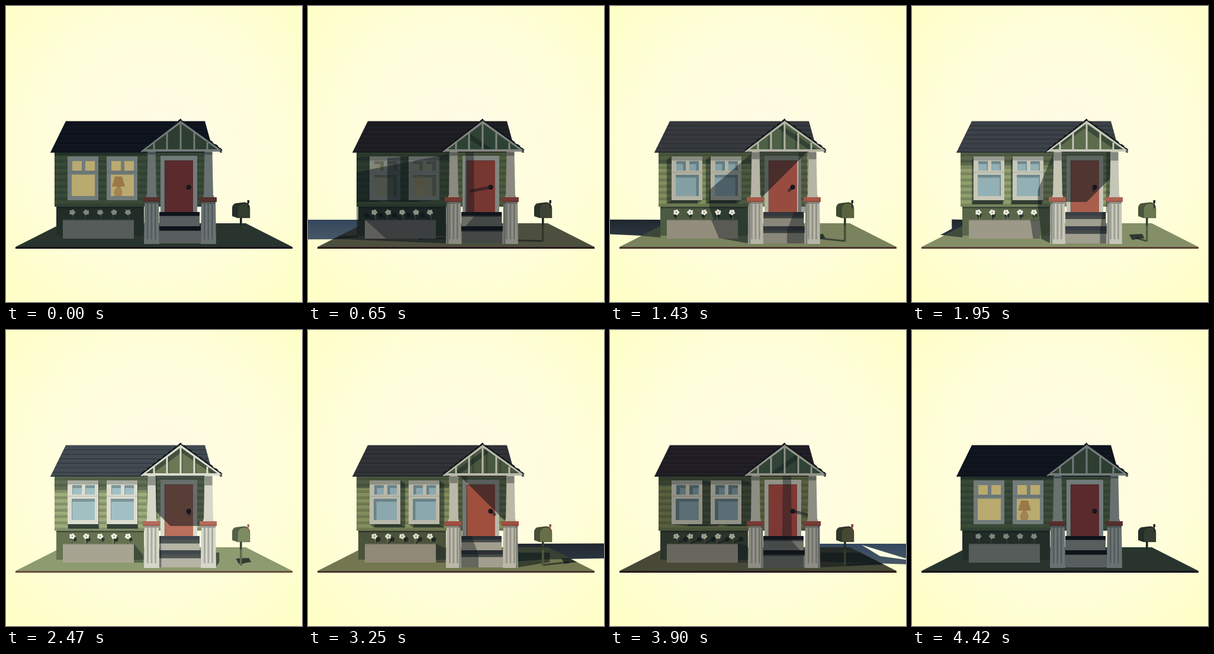
Recreate the animation shown at these times as an HTML page with a canvas. Size 500 by 500 pixels, loop 4.81 s.

```html
<!DOCTYPE html>
<html lang="en">
<head>
<meta charset="utf-8">
<title>House from dusk to dusk</title>
<style>
html, body { margin: 0; width: 100%; height: 100%; overflow: hidden; background: #ffffd8; }
canvas { display: block; width: 500px; height: 500px; }
</style>
</head>
<body>
<canvas id="stage" width="500" height="500"></canvas>
<script>
const ctx = document.getElementById('stage').getContext('2d');
const LOOP = 4810, STEP = 130, LAST = 33, NOON = 17;

// Colours of each material at these hours
const hours = [0, 7, 10, 18, 24, 27, 33];
const palette = {
  roof:    '0e131d 2a2426 35383d 414a51 303236 292226',
  wall:    '3a4a38 5c6841 828f5d 9eac7b 838e5e 676a43',
  gable:   '2d3d31 2f4537 4e6045 6a7855 48573f 324638',
  base:    '222d28 30372b 4d5a42 667250 4a523b 30372c',
  trim:    '717b7a 8d8d82 b2b2a3 dcddcf bab9a9 a39e8e',
  column:  '687170 a39c8d b6b4a5 d6d7c9 bbb8a8 a09b8c',
  door:    '5a2a2d 8d4034 984c40 ba705b a04e3e 8f3f36',
  brick:   '55302d 8c4036 a75747 b66a5a a04f40 8a4037',
  planter: '555c5a 67625a 928d7d a8a492 918977 716c5f',
  ground:  '28342d 68634a 7a835e 8e9a70 72774f 56523b',
  lip:     '17131a 38201d 4b3429 66503a 49342a 321c1d',
  riser:   '575e5d 77756a 898779 b5b4a5 a19e8e 7a7970',
  tread:   '0e131a 17171d 33373c 40474d 2c3035 17171f',
  pane:    '2c3a44 647d83 83a0a5 a2c0c4 8aa8ad 70898d',
  mailbox: '343c31 444833 59643f 7d8b62 686e48 4f4e36',
  petal:   '7d8886 959890 e9eae1 f8f9f1 dfdfd3 b1b0a4'
};
for (const name in palette) {
  const list = palette[name].split(' ').map(h => [0, 2, 4].map(i => parseInt(h.substr(i, 2), 16)));
  palette[name] = [...list, list[0]];
}

const clamp = (v, a, b) => Math.min(b, Math.max(a, v));
const dark = a => `rgba(10,20,27,${a})`;

function colorsAt(k) {
  let i = 0;
  while (i < hours.length - 2 && k >= hours[i + 1]) i++;
  const f = (k - hours[i]) / (hours[i + 1] - hours[i]);
  const out = {};
  for (const name in palette) {
    const a = palette[name][i], b = palette[name][i + 1];
    out[name] = `rgb(${a.map((v, n) => Math.round(v + (b[n] - v) * f))})`;
  }
  return out;
}

function trace(...p) {
  ctx.beginPath();
  for (let i = 0; i < p.length; i += 2) ctx.lineTo(p[i], p[i + 1]);
  ctx.closePath();
}
function poly(fill, ...p) { trace(...p); ctx.fillStyle = fill; ctx.fill(); }
function box(fill, x, y, w, h) { ctx.fillStyle = fill; ctx.fillRect(x, y, w, h); }
function line(color, width, ...p) {
  ctx.beginPath();
  for (let i = 0; i < p.length; i += 2) ctx.lineTo(p[i], p[i + 1]);
  ctx.strokeStyle = color;
  ctx.lineWidth = width;
  ctx.stroke();
}
function disc(fill, x, y, r) {
  ctx.beginPath();
  ctx.arc(x, y, r, 0, 7);
  ctx.fillStyle = fill;
  ctx.fill();
}
function clipped(shape, draw) {
  ctx.save();
  trace(...shape);
  ctx.clip();
  draw();
  ctx.restore();
}

function sky() {
  const g = ctx.createRadialGradient(255, 235, 30, 255, 235, 350);
  g.addColorStop(0, '#fffbe5');
  g.addColorStop(.55, '#fffeda');
  g.addColorStop(1, '#fefec6');
  box(g, 0, 0, 500, 500);
}

function ground(c, sun) {
  const plate = [16, 407, 95, 367, 405, 367, 484, 407];
  const { side, len, tilt } = sun;
  const x0 = side < 0 ? 90 : 350;
  const far = x0 + side * 300 * Math.max(0, len - .25);
  const low = side < 0 ? 374 + 7 * len : 371 + 15.5 * len;
  const cast = [x0, 361, far, 360.5, far, low, x0 + side * 42, 386 + 2 * len, x0 + side * 5, 391];
  const out = sun.up && len > .25;
  if (out) {
    const g = ctx.createLinearGradient(0, 361, 0, 400);
    g.addColorStop(0, len > 1.2 ? '#34475d' : '#20272e');
    g.addColorStop(1, len > 1.2 ? '#4a5a68' : '#323d4a');
    poly(g, ...cast);
    if (side > 0 && len > 1.2) poly('#fffee0', 425, 363, 500, 386, 500, 388, 456, 382);
  }
  poly(c.ground, ...plate);
  clipped(plate, () => {
    if (out) poly(dark(.55), ...cast);
    if (!sun.up) return;
    // porch pedestals and mailbox
    if (tilt > 0) poly(dark(.55), 234, 388, 234, 401, 234 - 50 * tilt, 393, 234 - 50 * tilt, 388);
    else poly(dark(.55), 354, 376, 354, 401, 354 - 60 * tilt, 392, 354 - 60 * tilt, 376);
    const dx = -50 * tilt;
    line(dark(.55), 3, 396, 397, 396 + dx, 392);
    poly(dark(.7), 383 + dx, 386, 405 + dx, 385, 409 + dx, 392, 388 + dx, 395);
  });
  box(c.lip, 16, 407, 468, 3);
}

function pane(c, x, y, w, h, glow, sun) {
  box(c.pane, x, y, w, h);
  ctx.globalAlpha = glow;
  box('#b9aa70', x, y, w, h);
  ctx.globalAlpha = 1;
  if (!sun.up) return;
  box(dark(.25), x, y, w, 5);
  const edge = clamp(5 * sun.len, 1, 6);
  box(dark(.25), sun.side < 0 ? x + w - edge : x, y + 5, edge, h - 5);
}

function windowAt(c, x, glow, lamp, sun) {
  if (sun.up) {
    const dx = -9 * sun.tilt, dy = 8 / (1 + .5 * sun.len);
    poly(dark(.45), x, 254, x + 52, 254, x + 52 + dx, 254 + dy, x + 52 + dx, 328 + dy, x + dx, 328 + dy, x + dx, 254 + dy);
    poly(dark(.45), x, 328, x + 52, 328, x + 52 + dx, 328 + dy, x + dx, 328 + dy);
  }
  box(c.trim, x, 254, 52, 74);
  if (sun.up) box(dark(.25), x, 254, 52, 7);
  box(dark(.12), x, 280, 52, 1.5);
  pane(c, x + 8, 262, 16, 16, glow, sun);
  pane(c, x + 30, 262, 16, 16, glow, sun);
  pane(c, x + 7, 285, 39, 36, glow, sun);
  if (lamp && glow) {
    ctx.globalAlpha = glow;
    poly('#9a7847', 184, 288, 196, 288, 201, 305, 179, 305);
    poly('#a28452', 187, 305, 193, 305, 197, 314, 195, 321, 184, 321, 182, 314);
    ctx.globalAlpha = 1;
  }
}

function wall(c, sun, glow) {
  box(c.base, 85, 338, 148, 50);
  box(c.wall, 82, 247, 254, 92);
  for (let y = 249; y < 338; y += 10.6) {
    box(dark(.17), 82, y, 254, 4.5);
    box(dark(.12), 82, y + 3.8, 254, 1);
  }
  box(dark(.35), 85, 339, 148, 3);
  const eave = sun.up ? 24 / (1 + .2 * sun.len) : 5;
  box(dark(.4), 82, 247, 156, eave);
  clipped([82, 247, 238, 247, 238, 339, 82, 339], () => {
    windowAt(c, 104, glow, false, sun);
    windowAt(c, 170, glow, true, sun);
  });
  if (!sun.up || sun.tilt <= 0) return;
  const w = 78 * sun.tilt;
  clipped([82, 247, 238, 247, 238, 388, 82, 388], () =>
    poly(dark(.45), 238, 250, 238 - w, 311, 238 - w, 339, 238 - w * .75, 388, 238, 388));
}

function mainRoof(c) {
  const shape = [101, 194.5, 336, 194.5, 348, 238, 348, 247.5, 75, 247.5];
  poly(c.roof, ...shape);
  clipped(shape, () => {
    for (let i = 1; i < 7; i++) {
      const y = 195 + i * 7.6;
      line(dark(.4), 1.2, 70, y, 350, y);
      line('rgba(180,190,200,.06)', 1, 70, y + 1.5, 350, y + 1.5);
    }
  });
  line(dark(.6), 1.5, 75, 247, 232, 247);
}

function entry(c, sun) {
  box(c.trim, 261, 253, 62, 96);
  box(c.door, 268, 261, 48, 87);
  line(dark(.3), 1, 268, 348, 268, 261, 316, 261);
  const area = [238, 247, 335, 247, 335, 349, 238, 349];
  if (sun.up) clipped(area, () => {
    const { tilt, side, len } = sun;
    // gable shadow: a diagonal that slides away from noon
    const at = d => 295 + side * (80 * len - 95 + d);
    poly(dark(.55), at(-40), 222, 295 + side * 105, 222, 295 + side * 105, 331, at(69), 331);
    const post = (tilt > 0 ? 334 : 239) - 17 * tilt;
    poly(dark(.4), post, 247, post + 14, 247, post + 15, 349, post - 1, 349);
    line(dark(.5), 5, 309, 306, 309 - 9 * tilt, 313);
  });
  disc('#11141a', 308.5, 306, 4);
  disc('#2a2c30', 307.5, 305, 1.2);
}

function steps(c, sun) {
  const lip = sun.up ? 7 / (1 + .6 * sun.len) : 1;
  for (const [y, depth, h, w] of [[348, 6, 18, 68], [372, 7, 22, 70]]) {
    box(c.tread, 259, y, w, depth);
    box(c.riser, 259, y + depth, w, h);
    box(dark(.6), 259, y + depth, w, lip);
  }
  if (!sun.up) return;
  const w = clamp(32 * sun.len, 0, 68);
  if (sun.tilt > 0) poly(dark(.4), 328, 348, 328 - w * .6, 348, 328 - w, 379, 328 - w, 401, 328, 401);
  else poly(dark(.4), 259, 348, 259 + w * .6, 348, 259 + w, 379, 259 + w, 401, 259, 401);
}

function pillar(c, x, sun) {
  poly(c.column, x + 7.5, 246, x + 20.5, 246, x + 22, 323, x + 6, 323);
  box(c.column, x + 5, 320, 18, 3);
  poly(c.column, x + 2, 331, x + 26, 331, x + 27, 402, x + 1, 402);
  for (const gx of [7.5, 14, 20.5]) {
    box(dark(.22), x + gx - 1.5, 334, 3, 60);
    box('rgba(255,255,240,.08)', x + gx + 1.5, 334, 1.5, 60);
  }
  box(dark(.3), x + 2, 331, 24, 3);
  box(c.brick, x - 1, 323, 29, 8);
  box(dark(.15), x - 1, 329, 29, 2);
  box(dark(.35), x + 7.5, 247, 13, sun.up ? 16 / (1 + .4 * sun.len) : 4);
  if (sun.up && sun.len > .3) {
    const edge = sun.tilt > 0 ? x + 2 : x + 23;
    box(dark(.3), edge, 331, 3.5, 71);
  }
}

function porchRoof(c, sun) {
  const face = [295, 196, 360, 244, 232, 244];
  poly(c.gable, ...face);
  if (sun.up) clipped(face, () => {
    const dx = -12 * sun.tilt;
    line(dark(.4), 8, 229 + dx, 250, 295 + dx, 202, 364 + dx, 250);
    for (const x of [272, 295, 318]) box(dark(.25), x + dx * .5, 198, 3, 46);
  });
  const bars = [[250, 231], [272, 214], [295, 198], [318, 214], [340, 231]];
  for (const [x, y] of bars) box(c.trim, x - 1.5, y, 3, 244 - y);
  box(c.trim, 229, 242, 134, 4);
  line(c.trim, 3.5, 228, 246, 295, 196, 364, 245);
  line('#11161c', 1.6, 227, 245, 295, 192.5, 365, 243.5);
  ctx.setLineDash([6, 5]);
  line('#11161c', 2, 230, 241.5, 295, 191.5, 363, 241);
  ctx.setLineDash([]);
  box(dark(.6), 361, 244, 4, 4);
}

function garden(c, sun) {
  box(c.planter, 96, 361, 120, 32);
  box(dark(.18), 96, 361, 120, 1.5);
  if (sun.up && sun.tilt > 0) {
    const w = Math.min(120, 50 * sun.tilt);
    poly(dark(.42), 216, 361, 216 - w, 361, 216 - w * .7, 393, 216, 393);
  }
  if (sun.up && sun.tilt < 0)
    poly(dark(.4), 216, 361, 232, 361 + 10 / (.4 + sun.len), 232, 393, 216, 393);
  for (let i = 0; i < 5; i++) {
    const x = 112 + i * 23.5, y = 348.5, lean = i % 2 ? 1 : -1;
    if (sun.up) {
      const sx = x + 3 - sun.tilt * 4;
      disc(dark(.6), sx, y + 5, 4);
      line(dark(.5), 2, sx, y + 5, x, 361);
    }
    ctx.beginPath();
    ctx.moveTo(x, y);
    ctx.quadraticCurveTo(x - lean * 3, y + 7, x - lean, 361);
    ctx.strokeStyle = c.mailbox;
    ctx.lineWidth = 1.5;
    ctx.stroke();
    for (let p = 0; p < 5; p++) {
      const a = p * 1.2566 + i * .7;
      disc(c.petal, x + 3.2 * Math.cos(a), y + 2.8 * Math.sin(a), 2.1);
    }
    disc('#9d9860', x, y, 1.2);
  }
}

function mailbox(c, sun) {
  box(c.mailbox, 395, 357, 3.5, 41);
  box(dark(.25), 395, 357, 3.5, 41);
  box(dark(.4), 395, 357, 3.5, 14);
  ctx.beginPath();
  ctx.moveTo(382, 355);
  ctx.lineTo(382, 341);
  ctx.quadraticCurveTo(383, 333, 390, 333);
  ctx.lineTo(403, 331.5);
  ctx.quadraticCurveTo(412, 333, 412, 342);
  ctx.lineTo(412, 358);
  ctx.lineTo(391, 358);
  ctx.closePath();
  ctx.fillStyle = c.mailbox;
  ctx.fill();
  ctx.fillStyle = dark(.35);
  ctx.fill();
  ctx.beginPath();
  ctx.moveTo(391, 358);
  ctx.lineTo(391, 343);
  ctx.quadraticCurveTo(392, 334, 402, 333);
  ctx.quadraticCurveTo(412, 334, 412, 343);
  ctx.lineTo(412, 358);
  ctx.closePath();
  ctx.fillStyle = c.mailbox;
  ctx.fill();
  ctx.strokeStyle = dark(.35);
  ctx.lineWidth = 1;
  ctx.stroke();
  const flag = sun.up && sun.tilt < 0 ? c.brick : '#20201f';
  line(flag, 1.5, 409, 342, 409, 329);
  box(flag, 407.5, 328, 3.5, 5);
}

function draw(k) {
  const up = Math.abs(k - NOON) < 13.5;
  const tilt = up ? clamp(Math.tan((NOON - k) * .105), -4, 4) : 0;
  const sun = { up, tilt, len: Math.abs(tilt), side: tilt > 0 ? -1 : 1 };
  const glow = clamp(Math.max((5 - k) / 2, (k - 29) / 2), 0, 1);
  const c = colorsAt(k);
  sky();
  ground(c, sun);
  wall(c, sun, glow);
  entry(c, sun);
  mainRoof(c);
  steps(c, sun);
  garden(c, sun);
  pillar(c, 232, sun);
  pillar(c, 328, sun);
  porchRoof(c, sun);
  mailbox(c, sun);
}

const start = performance.now();
let shown = -1;
function tick() {
  const t = (performance.now() - start) % LOOP;
  const k = clamp(Math.floor(t / STEP) - 1, 0, LAST);
  if (k !== shown) draw(shown = k);
  requestAnimationFrame(tick);
}
tick();
</script>
</body>
</html>
```
